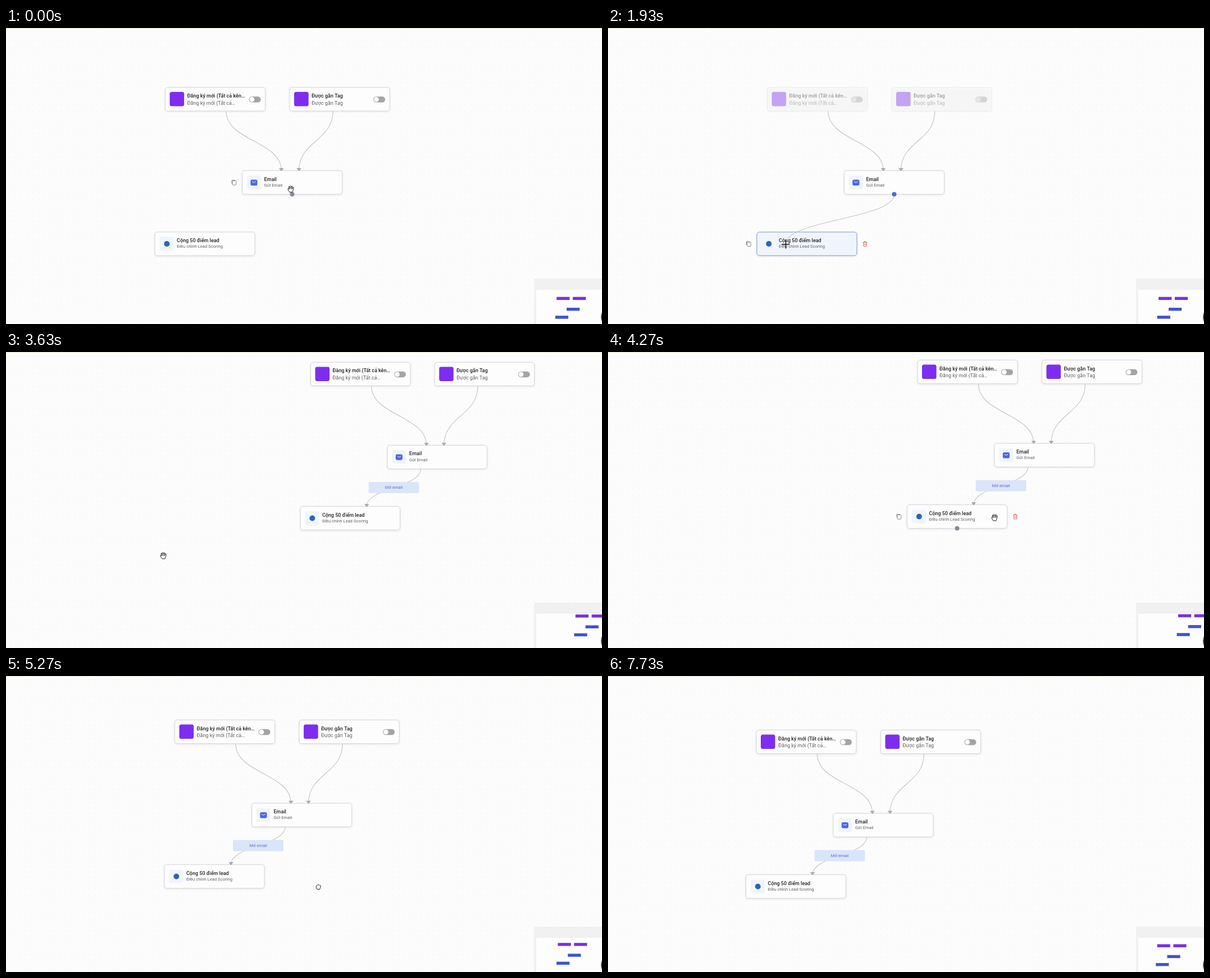
Write an HTML page with a canvas that moves like this. It is 1061 by 528 pixels and loops after 7760 ms.

```html
<!DOCTYPE html>
<html lang="vi">
<head>
<meta charset="utf-8">
<title>Workflow editor</title>
<style>
html, body { margin: 0; width: 100%; height: 100%; overflow: hidden; background: #fcfcfc; }
canvas { display: block; width: 1061px; height: 528px; }
</style>
</head>
<body>
<canvas id="stage"></canvas>
<script>
const W = 1061, H = 528, LOOP = 7760;
const PURPLE = '#7e2df0', BLUE = '#4a68e6', EDGE = '#c3c3c8';
const stage = document.getElementById('stage'), c = stage.getContext('2d');
const dpr = window.devicePixelRatio || 1;
stage.width = W * dpr;
stage.height = H * dpr;

// Card positions are relative to the email card
const CW = 178, CH = 42;
const signup = { x: -137, y: -148.5, title: 'Đăng ký mới (Tất cả kên…', sub: 'Đăng ký mới (Tất cả…' };
const tagged = { x: 84.5, y: -148.5, title: 'Được gắn Tag', sub: 'Được gắn Tag' };
const email = { x: 0, y: 0, title: 'Email', sub: 'Gửi Email' };
const lead = { x: -155.5, y: 109.5, title: 'Cộng 50 điểm lead', sub: 'Điều chỉnh Lead Scoring' };

// time, x, y of the email card, zoom
const VIEW = [
  [0, 420.5, 254.5, 1], [3000, 420.5, 254.5, 1], [3170, 431, 251.5, .9965],
  [3200, 431, 251.5, .9965], [3440, 679, 166.5, .9965], [3750, 679, 166.5, .9965],
  [3980, 688, 163, 1], [4830, 688, 163, 1], [5270, 437.5, 227, 1], [5600, 401, 245, 1]
];
// time, x, y
const POINTER = [
  [0, 507, 287], [250, 509, 295], [550, 509, 295], [1750, 316, 386], [2400, 316, 386],
  [2950, 257, 366], [3200, 257, 366], [3440, 505, 281], [3630, 280, 363], [3750, 280, 363],
  [4150, 688, 295], [4400, 688, 295], [4800, 806, 312], [4830, 806, 312],
  [5270, 556, 376], [5600, 520, 394]
];
const CURSORS = [[0, 'hand'], [250, 'cross'], [2150, 'arrow'], [3200, 'fist'], [3440, 'hand'],
  [4800, 'fist'], [5600, 'hand'], [6200, 'none']];
const LINK_START = 550, LINK_END = 2150;

function at(keys, t) {
  const i = keys.findIndex(k => k[0] > t);
  if (i < 0) return keys[keys.length - 1].slice(1);
  const a = keys[i - 1], b = keys[i];
  const p = (t - a[0]) / (b[0] - a[0]), e = p * p * (3 - 2 * p);
  return a.slice(1).map((v, j) => v + (b[j + 1] - v) * e);
}

function box(x, y, w, h, r, fill, stroke) {
  c.beginPath();
  c.roundRect(x, y, w, h, r);
  if (fill) { c.fillStyle = fill; c.fill(); }
  if (stroke) { c.strokeStyle = stroke; c.stroke(); }
}

function disc(x, y, r, fill) {
  c.beginPath();
  c.arc(x, y, r, 0, 7);
  c.fillStyle = fill;
  c.fill();
}

function line(d, stroke, fill) {
  const p = new Path2D(d);
  if (fill) { c.fillStyle = fill; c.fill(p); }
  c.strokeStyle = stroke;
  c.stroke(p);
}

function text(s, x, y, size, fill, weight = 400) {
  c.font = `${weight} ${size}px Roboto, sans-serif`;
  c.fillStyle = fill;
  c.fillText(s, x, y);
}

function curve(x1, y1, x2, y2, arrow) {
  const m = (y1 + y2) / 2;
  c.lineWidth = 1.1;
  line(`M${x1} ${y1}C${x1} ${m} ${x2} ${m} ${x2} ${y2}`, EDGE);
  if (!arrow) return;
  c.lineWidth = 1;
  line(`M${x2 - 3.5} ${y2 - 4}h7l-3.5 4.5z`, '#a9a9ae', '#a9a9ae');
}

function card(n, active) {
  c.save();
  c.translate(n.x, n.y);
  c.lineWidth = 1;
  c.shadowColor = 'rgba(60,60,80,.14)';
  c.shadowBlur = 4 * dpr;
  c.shadowOffsetY = dpr;
  box(0, 0, CW, CH, 4.5, active ? '#f0f5fd' : '#fdfdfd');
  c.shadowColor = 'transparent';
  box(0, 0, CW, CH, 4.5, null, active ? '#8095d6' : '#d6d6da');
  const trigger = n === signup || n === tagged;
  if (trigger) {
    box(8, 8, 25.6, 25.6, 3.5, PURPLE);
    box(149, 16.3, 21, 10.4, 5.2, '#a4a4a8');
    disc(154.4, 21.5, 4.4, '#fdfdfd');
  } else {
    box(8.5, 8.5, 25, 25, 3.5, '#f0f5fd');
    if (n === email) {
      box(14.8, 16, 12.2, 10.4, 2.5, BLUE);
      line('M17.6 19.2l3.3 2.2l3.3 -2.2', '#fff');
    } else disc(21.3, 21, 5, '#2c62bd');
  }
  text(n.title, 39, 18, 9, '#222226', 500);
  text(n.sub, 39, trigger ? 30.7 : 28.4, trigger ? 9 : 7.65, '#606066');
  c.restore();
}

function copyIcon(n) {
  const x = n.x - 14.5, y = n.y + 21;
  disc(x, y, 8, '#fff');
  c.lineWidth = .9;
  line(`M${x - 4} ${y + 2}v-6h6`, '#77777c');
  box(x - 2.8, y - 3, 6.6, 7.6, 1.2, '#fff', '#77777c');
}

function trashIcon(n) {
  const x = n.x + CW + 14.5, y = n.y + 21;
  disc(x, y, 8, '#fff');
  c.lineWidth = .9;
  line(`M${x - 4} ${y - 2.6}h8m-5.3 0v-1.6h2.6v1.6m-4.3 0l.5 7h5l.5 -7m-3.8 2v3m2 -3v3`, '#d0605c');
}

function dots(px, py, s) {
  const gap = 10.4 * s;
  const mod = v => (v % gap + gap) % gap;
  c.fillStyle = '#eaeae0';
  for (let y = mod(py - 241.5 * s); y < H; y += gap)
    for (let x = mod(px - 414.3 * s); x < W; x += gap)
      c.fillRect(Math.floor(x), Math.floor(y), 1, 1);
}

function minimap(px, py) {
  c.fillStyle = '#f1f1f1';
  c.fillRect(940, 447, W - 940, H - 447);
  c.fillStyle = '#fdfdfd';
  c.fillRect(944, 467, W - 944, H - 467);
  for (const n of [signup, tagged, email, lead]) {
    c.fillStyle = n.y < 0 ? '#7a2fe3' : '#4053cf';
    c.fillRect(998 + .13 * (px - 420.5 + n.x), 499 + .13 * (py - 254.5 + n.y), 23.2, 5.4);
  }
  disc(1080, 515.5, 20.8, '#4a1fb0');
}

function cursor(kind, x, y) {
  c.save();
  c.translate(x, y);
  c.lineJoin = c.lineCap = 'round';
  c.lineWidth = 1;
  if (kind === 'arrow')
    line('M.5 .5v10l2.3 -2.1l1.6 3.6l1.6 -.7l-1.6 -3.5h3.1z', '#222', '#fff');
  if (kind === 'cross') {
    c.lineWidth = 1.5;
    line('M-6.5 0h13.5M.5 -7v14', '#111');
  }
  if (kind === 'hand') {
    line('M-2.5 5.5L-5 1.2Q-5.6 -.6 -4 -.5L-2.8 .6L-3.9 -3.4Q-3.6 -5 -2.4 -4L-1.7 -2.4V-4.7Q-.5 -6.3 .5 -4.7L.8 -2.6L1.5 -4.5Q2.8 -5.5 3.2 -4L3 -1.5L4 -2.8Q5.4 -3 5.2 -1.6L4 2.6L3 5.5z', '#222', '#fff');
    line('M-1.7 -2.4L-1.2 0M.8 -2.6V0M3 -1.5L2.5 .2', '#222');
  }
  if (kind === 'fist')
    line('M-2.5 4L-4 1Q-4.4 -1 -3 -1.2Q-3.4 -3.4 -1.6 -3.3Q-.6 -4.4 .6 -3.5Q1.8 -4 2.5 -2.9Q4.3 -3 4 -.6L3.4 2L2.6 4z', '#222', '#fff');
  c.restore();
}

function draw(t) {
  const [px, py, s] = at(VIEW, t), [mx, my] = at(POINTER, t);
  const kind = CURSORS.filter(k => k[0] <= t).pop()[1];
  const wx = (mx - px) / s, wy = (my - py) / s;
  const linking = t >= LINK_START && t < LINK_END;
  const over = n => kind !== 'fist' && kind !== 'none' &&
    wx >= n.x && wx <= n.x + CW && wy >= n.y && wy <= n.y + CH;

  c.setTransform(dpr, 0, 0, dpr, 0, 0);
  c.fillStyle = '#fcfcfc';
  c.fillRect(0, 0, W, H);
  dots(px, py, s);
  c.fillStyle = '#e9e9d8';
  c.fillRect(0, 0, W, 1);

  c.save();
  c.translate(px, py);
  c.scale(s, s);
  c.globalAlpha = linking ? .42 : 1;
  card(signup);
  card(tagged);
  c.globalAlpha = 1;
  card(email);
  card(lead, linking && over(lead));
  curve(-28.5, -106, 69.7, 0, true);
  curve(77 + tagged.x, -106, 101, 0, true);
  if (t >= LINK_END) {
    curve(59.5, CH, lead.x + 118.5, lead.y, true);
    box(-33.5, 65.5, 90, 20, 2, '#dae5fa');
    c.textAlign = 'center';
    text('Mở email', 11.5, 78.2, 7.65, '#5a6bd6');
    c.textAlign = 'left';
  }
  for (const n of [email, lead]) {
    if (!over(n)) continue;
    copyIcon(n);
    if (n === lead) trashIcon(n);
    if (!linking) disc(n.x + 89, n.y + CH, 4, '#858b96');
  }
  if (linking) {
    curve(89, CH, wx, wy);
    disc(89, CH, 4, BLUE);
  }
  c.restore();

  minimap(px, py);
  cursor(kind, mx, my);
}

function frame(now) {
  draw(now % LOOP);
  requestAnimationFrame(frame);
}
draw(0);
requestAnimationFrame(frame);
</script>
</body>
</html>
```
